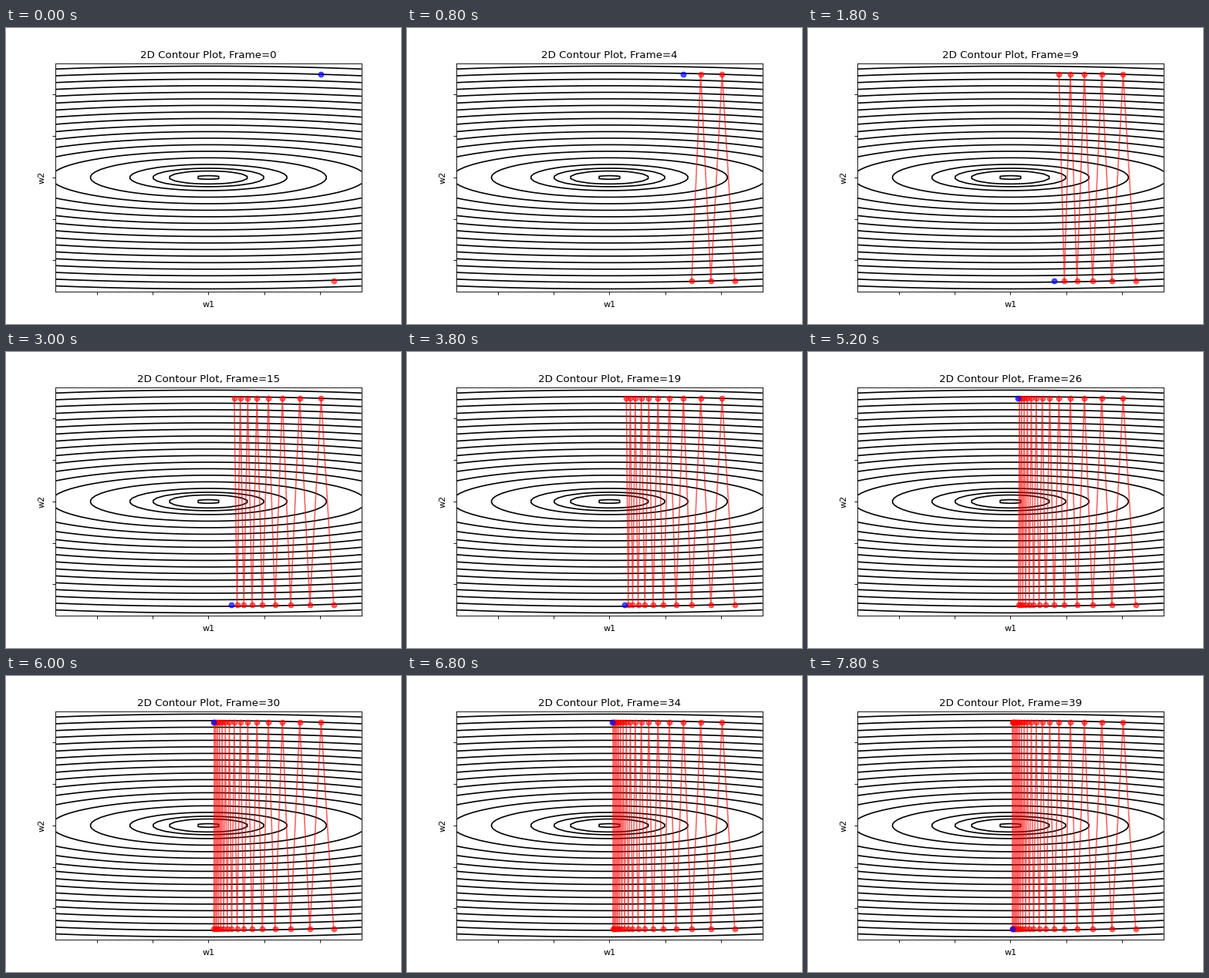
These frames come from a looping animation (512x384 px, 8 s). A matplotlib script:

```python
import numpy as np
import matplotlib.pyplot as plt
from matplotlib.animation import FuncAnimation

FRAMES = 40
LIMIT = 2.75

fig, ax = plt.subplots(figsize=(6.4, 4.8), dpi=80)

# Quadratic bowl, 20 times steeper along w2
grid = np.linspace(-LIMIT, LIMIT, 100)
w1, w2 = np.meshgrid(grid, grid)
levels = sorted([0.1, 2] + [k * k for k in range(1, 18)])
ax.contour(w1, w2, 2 * w1**2 + 40 * w2**2, levels=levels, colors="black")

# Gradient descent: w1 shrinks by 10% a step while w2 flips its sign
step = np.arange(1, FRAMES + 2)
path_x = 2.5 * 0.9**step
path_y = 2.5 * (-1.0)**step

trail, = ax.plot([], [], "ro-", alpha=0.6)
head, = ax.plot([], [], "bo", alpha=0.7)

ax.set_xlim(-LIMIT, LIMIT)
ax.set_ylim(-LIMIT, LIMIT)
ax.set_xticks(range(-2, 3))
ax.set_yticks(range(-2, 3))
ax.set_xticklabels([])
ax.set_yticklabels([])
ax.set_xlabel("w1")
ax.set_ylabel("w2")
title = ax.set_title("2D Contour Plot, Frame=0")


def update(i):
    trail.set_data(path_x[:i + 1], path_y[:i + 1])
    head.set_data(path_x[i + 1:i + 2], path_y[i + 1:i + 2])
    title.set_text(f"2D Contour Plot, Frame={i}")
    return trail, head, title


anim = FuncAnimation(fig, update, frames=FRAMES, interval=200, repeat=True)
plt.show()
```
